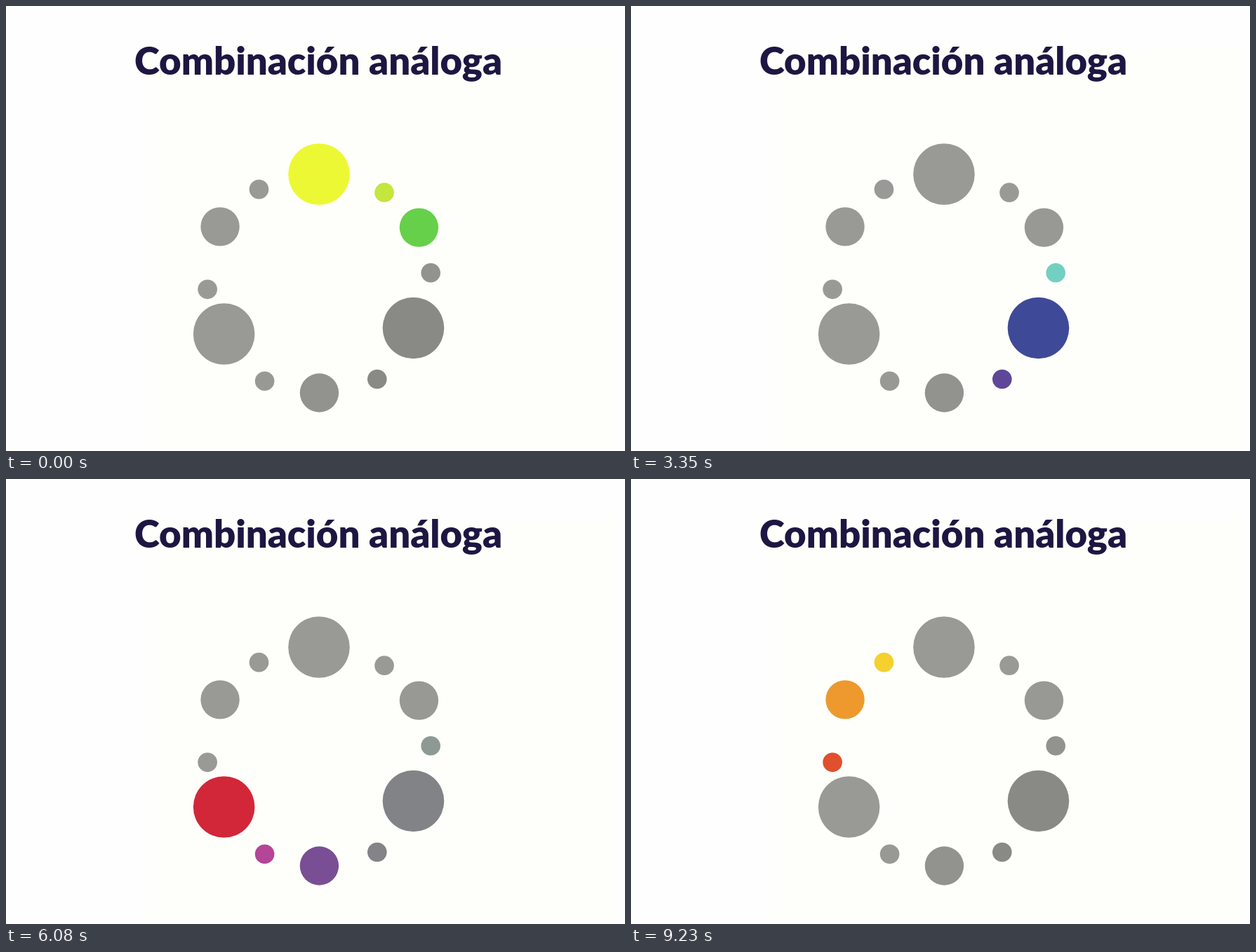
Recreate the animation shown at these times as an HTML page with a canvas. Size 882 px wide and 635 px high, loop 10 s.

```html
<!DOCTYPE html>
<html lang="es">
<head>
<meta charset="utf-8">
<title>Combinación análoga</title>
<style>
  html, body { margin: 0; width: 100%; height: 100%; overflow: hidden; background: #fefefe; }
  canvas { display: block; }
</style>
</head>
<body>
<canvas id="stage" width="882" height="635"></canvas>
<script>
const ctx = document.getElementById('stage').getContext('2d');
const LOOP = 10000;
const FADE = 560;
const STARTS = [-FADE, 2610, 5580, 8370];

// Each dot size sits on its own ring
const LARGE = { size: 43.8, x: 443.3, y: 392.6, radius: 152.6 };
const MEDIUM = { size: 27.7, x: 446.4, y: 391.3, radius: 160.7 };
const SMALL = { size: 13.8, x: 446.4, y: 396, radius: 159.5 };
const RINGS = [LARGE, SMALL, MEDIUM, SMALL];

// Clockwise from the top, three neighbours per palette
const ANGLES = [1, 35.5, 62.1, 84.5, 116, 148.9, 180, 209.2, 240.4, 267, 298.4, 327.4];
const COLOURS = ('edf834 c4e63e 66d04b 73d0c0 3e4a98 5e4798 ' +
                 '764696 b73b97 d91a2e e0502e ed992e f5d02e').split(' ').map(toRgb);

function toRgb(hex) {
  const n = parseInt(hex, 16);
  return [n >> 16, n >> 8 & 255, n & 255];
}

// Warm grey, darkest at the lower right
function greyAt(i) {
  const g = 153 - 18 * Math.exp(-((i - 4.5) ** 2) / 2.5);
  return [g, g + 1, g - 4];
}

const dots = ANGLES.map((degrees, i) => {
  const ring = RINGS[i % RINGS.length];
  const a = degrees * Math.PI / 180;
  return {
    x: ring.x + ring.radius * Math.sin(a),
    y: ring.y - ring.radius * Math.cos(a),
    size: ring.size,
    grey: greyAt(i),
    colour: COLOURS[i],
    palette: Math.floor(i / 3)
  };
});

const clamp = v => Math.max(0, Math.min(1, v));
const mix = (a, b, p) => `rgb(${a.map((v, i) => Math.round(v + (b[i] - v) * p))})`;

// Share of a palette's colour: fades in at its start, out at the next one
function glow(palette, t) {
  const rise = i => i < STARTS.length ? clamp((t - STARTS[i]) / FADE) : 0;
  return rise(palette) - rise(palette + 1);
}

function draw(t) {
  ctx.fillStyle = '#fefefe';
  ctx.fillRect(0, 0, 882, 635);
  ctx.fillStyle = '#fefffa';
  ctx.fillRect(198, 57, 670, 573);

  ctx.fillStyle = '#1e1642';
  ctx.font = '900 54.4px Lato, sans-serif';
  ctx.textAlign = 'center';
  ctx.fillText('Combinación análoga', 445, 98);

  for (const d of dots) {
    ctx.fillStyle = mix(d.grey, d.colour, glow(d.palette, t));
    ctx.beginPath();
    ctx.arc(d.x, d.y, d.size, 0, Math.PI * 2);
    ctx.fill();
  }
}

const begin = performance.now();
function tick() {
  draw((performance.now() - begin) % LOOP);
  requestAnimationFrame(tick);
}
tick();
</script>
</body>
</html>
```
